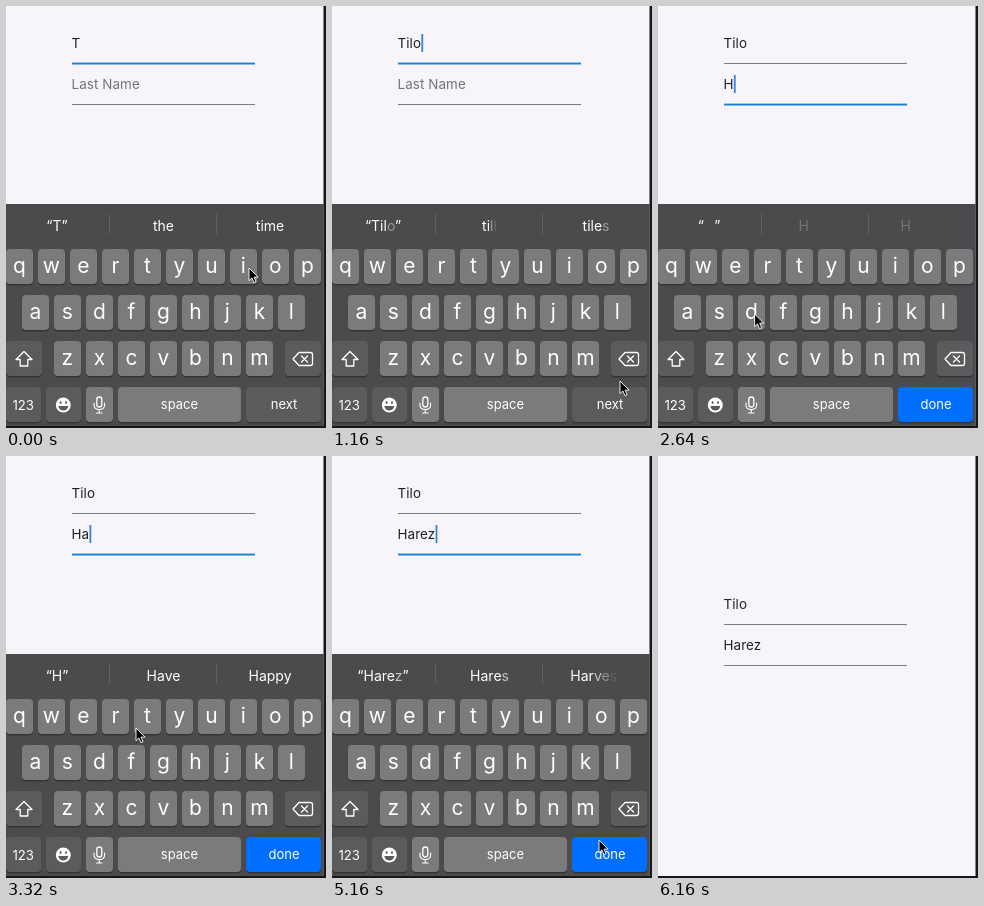
These frames come from a looping animation (320 px wide and 422 px high, 7 s). An HTML page:

```html
<!DOCTYPE html>
<html lang="en">
<head>
<meta charset="utf-8">
<title>Name form</title>
<style>
html, body { margin: 0; width: 100%; height: 100%; overflow: hidden; background: #f7f5f9; }
svg { display: block; width: 320px; height: 422px; font-family: Inter, Roboto, sans-serif; }
text { white-space: pre; }
</style>
</head>
<body>
<svg id="stage" viewBox="0 0 320 422">
  <rect width="320" height="422" fill="#f7f5f9"/>
  <g id="form"></g>
  <g id="board"></g>
  <path d="M317.5 0H320V422H0V420H317.5Z" fill="#18161a"/>
  <path id="pointer" d="M0 0V12.6L2.9 9.9L4.9 14.6L7.1 13.7L5.1 9.1H9.1Z" fill="#000" stroke="#fff" stroke-width="0.9"/>
</svg>
<script>
const LOOP = 7000;
const NEXT = 1680, LOWER = 2440, DONE = 5460, SLIDE = 5480, SLIDE_END = 6160, FORM_END = 5840;
const FIRST = "Tilo", LAST = "Harez";
const BLUE = "#1682d2", KEY = "#7b7a7d", DARK = "#5b5a5d", BACK = "#4b4a4c";

// Moments at which each letter appears in its field
const firstTimes = [0, 240, 680, 1040];
const lastTimes = [2400, 3200, 3900, 4500, 4960];

const hints = [
  [-1000, "“T”", "the", "time"],
  [400, "“Ti”", "time", "tip"],
  [860, "“Til”", "time", "tile"],
  [1080, "“Tilo”", "till", "tiles"],
  [NEXT, "", "", ""],
  [2600, "“H”", "Have", "Happy"],
  [3400, "“Ha”", "Have", "Hand"],
  [4000, "“Har”", "Hard", "Harsh"],
  [4680, "“Hare”", "Hare", "Harbor"],
  [5040, "“Harez”", "Hares", "Harvest"]
];

// Pointer path: time, x, y
const path = [
  [0, 243, 262], [160, 243, 262], [560, 283, 306], [700, 283, 306], [880, 270, 264],
  [980, 270, 266], [1160, 288, 375], [1320, 284, 400], [1680, 282, 400], [1960, 179, 340],
  [2160, 188, 308], [2400, 188, 308], [2840, 28, 308], [3120, 28, 308], [3320, 130, 272],
  [3460, 112, 264], [3860, 110, 264], [4120, 72, 263], [4460, 72, 265], [4720, 58, 352],
  [4920, 58, 352], [5160, 267, 384], [5300, 272, 394], [5520, 272, 394], [5800, 330, 424]
];

const $ = id => document.getElementById(id);
const clamp = v => Math.max(0, Math.min(1, v));
const ease = v => { v = clamp(v); return v * v * (3 - 2 * v); };
const span = (t, a, b) => ease((t - a) / (b - a));

function add(parent, tag, attrs, label) {
  const el = document.createElementNS("http://www.w3.org/2000/svg", tag);
  set(el, attrs);
  if (label !== undefined) el.textContent = label;
  parent.appendChild(el);
  return el;
}
function set(el, attrs) {
  for (const k in attrs) el.setAttribute(k, attrs[k]);
}

// Form
const form = $("form");
function field(y) {
  return {
    y,
    text: add(form, "text", { x: 65.5, y: y + 5, "font-size": 13.4, "letter-spacing": 0.1 }),
    line: add(form, "rect", { x: 66, width: 183 }),
    caret: add(form, "rect", { y: y - 9, width: 1.8, height: 18, fill: "#3a80dd" })
  };
}
const first = field(37), last = field(78);

function drawField(f, value, hint, focus, blinkOff) {
  f.text.textContent = value || hint;
  set(f.text, { fill: value ? "#1f1e21" : "#757378" });
  set(f.line, focus
    ? { y: f.y + 19.6, height: 1.9, fill: BLUE }
    : { y: f.y + 20, height: 1, fill: "#7d7b80" });
  const x = value ? 65.8 + f.text.getComputedTextLength() : 66;
  set(f.caret, { x: x, opacity: focus && !blinkOff ? 1 : 0 });
}

// Keyboard
const board = $("board");
add(board, "rect", { y: 198, width: 317.5, height: 224, fill: BACK });
for (const x of [103, 210]) add(board, "rect", { x, y: 208, width: 1, height: 20, fill: "#605f62" });

function key(x, y, w, fill) {
  add(board, "rect", { x, y: y + 1, width: w, height: 35.5, rx: 4, fill: "#343335" });
  return add(board, "rect", { x, y, width: w, height: 35, rx: 4, fill });
}
function label(x, y, size, str) {
  return add(board, "text", { x, y, "font-size": size, fill: "#fff", "text-anchor": "middle" }, str);
}

const letters = [];
[["qwertyuiop", 0], ["asdfghjkl", 16], ["zxcvbnm", 48]].forEach(([row, left], r) => {
  [...row].forEach((c, i) => {
    const x = left + i * 32, y = 243 + r * 46;
    key(x, y, 27, KEY);
    letters.push({ c, y, el: label(x + 13.4, y, 21, c) });
  });
});

const shiftKey = key(0, 335, 36, DARK);
const shift = add(board, "path", {
  d: "M18 345.5L26 353.5H21.8V360H14.2V353.5H10Z", "stroke-width": 1.3, "stroke-linejoin": "round"
});
key(279, 335, 36, DARK);
const line = { fill: "none", stroke: "#fff", "stroke-width": 1.3, "stroke-linecap": "round", "stroke-linejoin": "round" };
add(board, "path", { ...line, d: "M293 346.5H304.5Q306.5 346.5 306.5 348.5V357.5Q306.5 359.5 304.5 359.5H293L287 353ZM295.5 350L301.5 356M301.5 350L295.5 356" });

key(0, 381, 35, DARK);
label(17.2, 403.6, 13.2, "123");
key(40, 381, 35, DARK);
add(board, "circle", { cx: 57.3, cy: 399, r: 7.5, fill: "#fff" });
for (const x of [54.6, 60]) add(board, "ellipse", { cx: x, cy: 396.6, rx: 1, ry: 1.4, fill: DARK });
add(board, "path", { d: "M52.3 400H62.3Q61.3 404.6 57.3 404.6T52.3 400Z", fill: DARK });
key(80, 381, 27, KEY);
add(board, "rect", { ...line, x: 90.8, y: 391, width: 5, height: 10, rx: 2.5 });
add(board, "path", { ...line, "stroke-width": 1.1, d: "M88 397V399Q88 403.6 93.3 403.6T98.6 399V397M93.3 403.6V407M90.5 407H96.1" });
key(112, 381, 123, KEY);
label(173.5, 403, 13, "space");
const goKey = key(240, 381, 75, DARK);
const goText = label(278, 403, 13, "next");

const slots = [51, 157.5, 264].map(x => label(x, 225, 14, ""));

function drawHints(t) {
  let n = hints.length - 1;
  while (hints[n][0] > t) n--;
  slots.forEach((el, i) => {
    const word = hints[n][i + 1], old = n ? hints[n - 1][i + 1] : "";
    let same = 0;
    while (same < word.length && word[same] === old[same]) same++;
    el.textContent = "";
    // Letters that differ from the previous word fade in one by one
    [...word].forEach((c, k) => {
      const fresh = k >= same && c !== "”" && c !== "“";
      const a = fresh ? clamp((t - hints[n][0] - (k - same) * 50) / 180) : 1;
      add(el, "tspan", { "fill-opacity": a.toFixed(3) }, c);
    });
  });
}

let capsNow = null;
function drawCaps(caps) {
  if (caps === capsNow) return;
  capsNow = caps;
  for (const k of letters) {
    k.el.textContent = caps ? k.c.toUpperCase() : k.c;
    set(k.el, { y: k.y + (caps ? 25 : 23.5), "font-size": caps ? 20 : 21 });
  }
  set(shiftKey, { fill: caps ? "#dddbde" : DARK });
  set(shift, { fill: caps ? "#000" : "none", stroke: caps ? "#000" : "#fff" });
}

function drawPointer(t) {
  let i = 0;
  while (i < path.length - 2 && path[i + 1][0] <= t) i++;
  const [t0, x0, y0] = path[i], [t1, x1, y1] = path[i + 1];
  const p = span(t, t0, t1);
  set($("pointer"), { transform: `translate(${x0 + (x1 - x0) * p} ${y0 + (y1 - y0) * p})` });
}

const typed = (word, times, t) => word.slice(0, times.filter(m => m <= t).length);

function draw(t) {
  const second = t >= NEXT;
  drawField(first, typed(FIRST, firstTimes, t), "First Name", !second, t < 160);
  drawField(last, typed(LAST, lastTimes, t), "Last Name", second && t < DONE, false);
  set(form, { transform: `translate(0 ${111 * span(t, SLIDE, FORM_END)})` });

  drawCaps(second && t < LOWER);
  set(goKey, { fill: second ? "#006fff" : DARK });
  goText.textContent = second ? "done" : "next";
  drawHints(t);
  set(board, { transform: `translate(0 ${224 * span(t, SLIDE, SLIDE_END)})` });
  drawPointer(t);
}

const start = performance.now();
function tick() {
  draw((performance.now() - start) % LOOP);
  requestAnimationFrame(tick);
}
tick();
</script>
</body>
</html>
```
